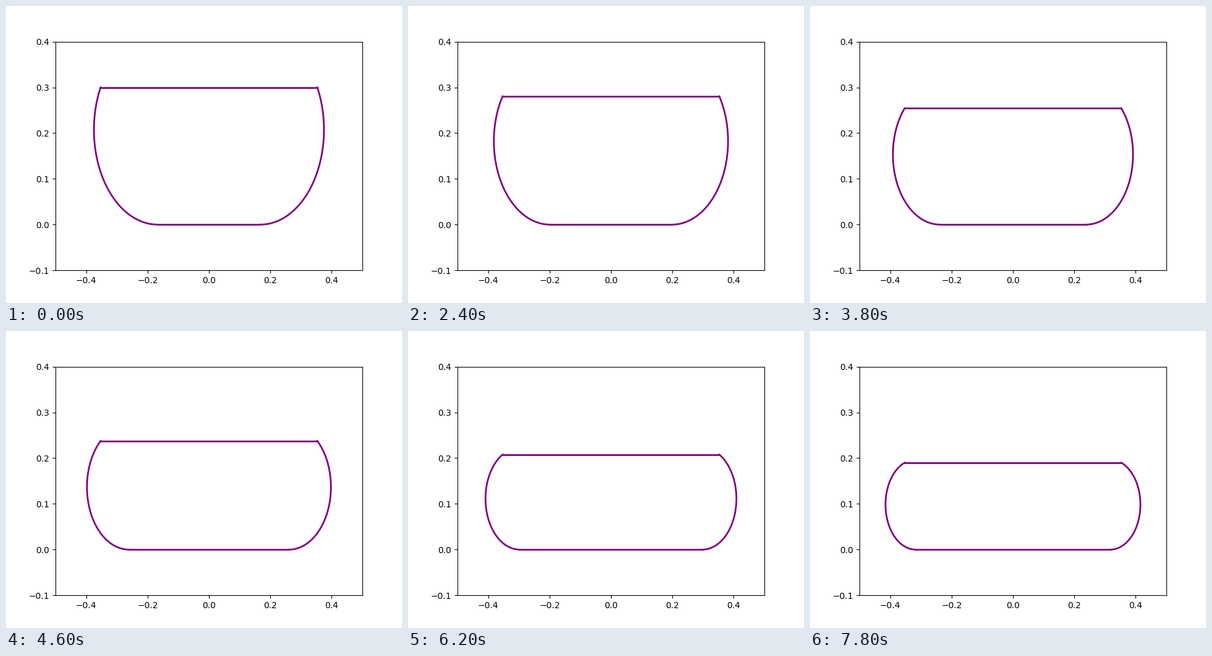
A matplotlib script that plays this animation: 640 px wide and 480 px high, repeating every 8 s.

```python
import numpy as np
import matplotlib.pyplot as plt
from matplotlib.animation import FuncAnimation

HALF = 0.353              # half width of the rigid top plate
LENGTH = 3 * np.pi / 8    # free length of the membrane
P, M, G = 2000, 100, 9.8
DT = 0.01
FRAMES = 40


def shape(h):
    """Side radius, half contact width and angle of the top corner at height h."""
    lo, hi = h / 2, h
    for _ in range(50):
        r = (lo + hi) / 2
        psi = np.arcsin((h - r) / r)
        c = HALF - r * np.cos(psi)
        if c + r * (np.pi / 2 + psi) > LENGTH / 2:
            lo = r
        else:
            hi = r
    return r, c, psi


def simulate(h=0.3, v=0.0):
    heights = []
    for _ in range(FRAMES):
        heights.append(h)
        c = shape(h)[1]
        h, v = h + v * DT, v + (P * 2 * c / M - G) * DT
    return heights


heights = simulate()

fig, ax = plt.subplots(figsize=(6.4, 4.8), dpi=100)
ax.set_xlim(-0.5, 0.5)
ax.set_ylim(-0.1, 0.4)
top, bottom, left, right = [
    ax.plot([], [], color="purple", lw=2)[0] for _ in range(4)
]


def draw(i):
    h = heights[i]
    r, c, psi = shape(h)
    a = np.linspace(-np.pi / 2, psi, 100)
    x, y = c + r * np.cos(a), r + r * np.sin(a)
    top.set_data([-HALF, HALF], [h, h])
    bottom.set_data([-c, c], [0, 0])
    left.set_data(-x, y)
    right.set_data(x, y)
    return top, bottom, left, right


anim = FuncAnimation(fig, draw, frames=FRAMES, interval=200,
                     repeat=True, repeat_delay=0)
plt.show()
```
